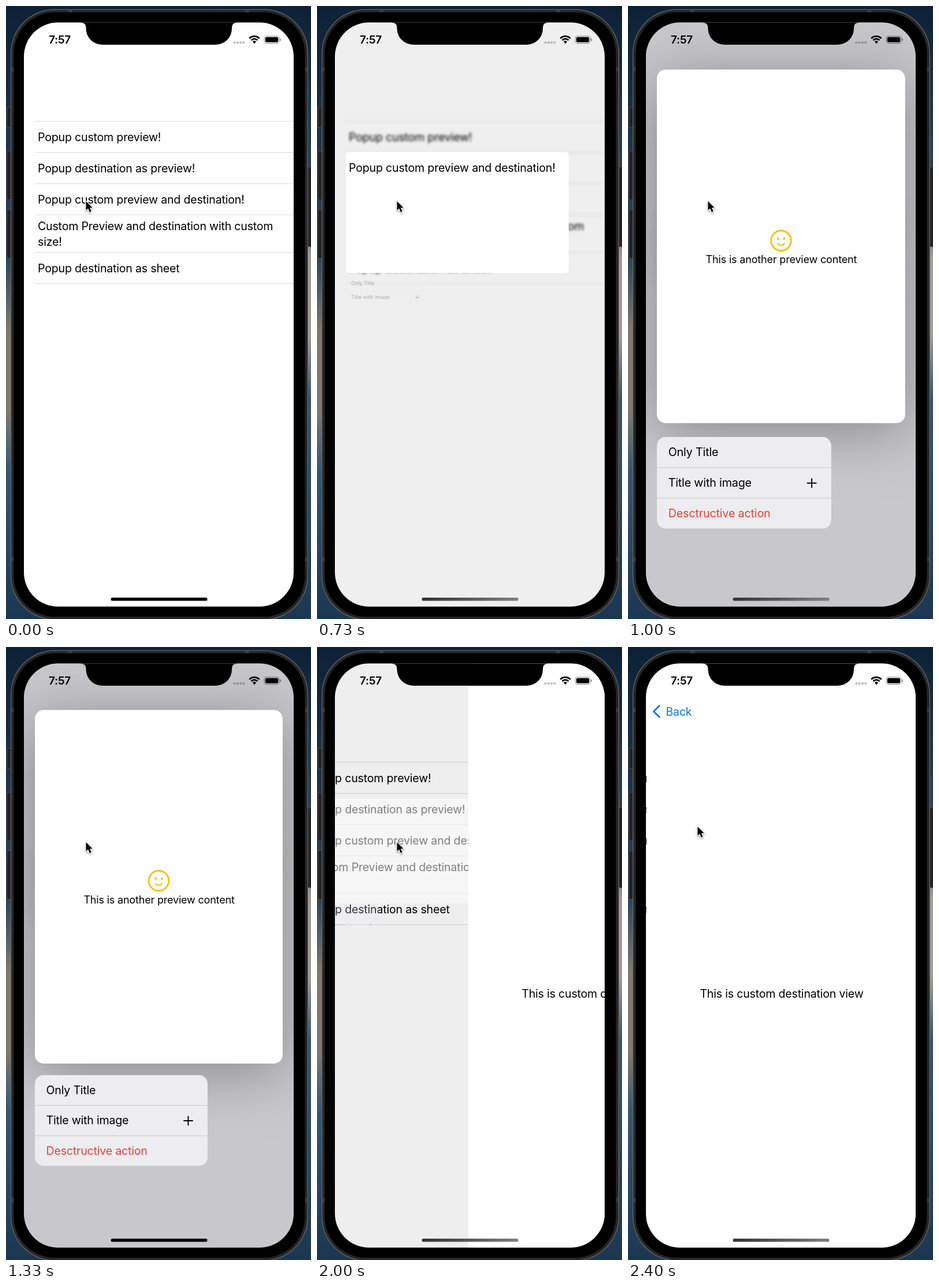
Recreate the animation shown at these times as an HTML page with a canvas. Size 528 by 1061 pixels, loop 2.47 s.

```html
<!DOCTYPE html>
<html lang="en">
<head>
<meta charset="utf-8">
<title>Context menu preview</title>
<style>
html, body { margin: 0; width: 100%; height: 100%; overflow: hidden; background: #000; }
canvas { display: block; width: 528px; height: 1061px; }
</style>
</head>
<body>
<canvas id="stage" width="528" height="1061"></canvas>
<script>
const c = document.getElementById('stage').getContext('2d');
const LOOP = 2470, STEP = 66.7, LAST = 36;
const OPEN_AT = 668, CLOSE_AT = 1900;
const SCREEN = { x: 31, y: 28.5, w: 467, h: 1011 };
const BLUE = '#0a76e8';
const ROWS = [
  ['Popup custom preview!'],
  ['Popup destination as preview!'],
  ['Popup custom preview and destination!'],
  ['Custom Preview and destination with custom', 'size!'],
  ['Popup destination as sheet']
];

const clamp = v => Math.min(1, Math.max(0, v));
const ramp = (v, a, b) => clamp((v - a) / (b - a));
const mix = (a, b, k) => a + (b - a) * k;

// Slightly bouncy spring that opens the preview
function openSpring(t) {
  const s = Math.max(0, t - OPEN_AT), a = .0119, b = .0088;
  return 1 - Math.exp(-a * s) * (Math.cos(b * s) + a / b * Math.sin(b * s));
}

// Critically damped spring that pushes the next page
function pushSpring(t) {
  const s = Math.max(0, t - CLOSE_AT) * .0168;
  return 1 - (1 + s) * Math.exp(-s);
}

function box(x, y, w, h, r, fill) {
  c.beginPath();
  c.roundRect(x, y, w, h, r);
  if (fill) { c.fillStyle = fill; c.fill(); }
}

function text(s, x, y, { size = 19.6, color = '#000', weight = 400, align = 'left' } = {}) {
  c.font = `${weight} ${size}px Inter, sans-serif`;
  c.letterSpacing = -size * .0105 + 'px';
  c.textAlign = align;
  c.fillStyle = color;
  c.fillText(s, x, y);
}

function stroke(color, width, points) {
  c.beginPath();
  points.forEach(([x, y]) => c.lineTo(x, y));
  c.strokeStyle = color;
  c.lineWidth = width;
  c.stroke();
}

function group(draw) {
  c.save();
  draw();
  c.restore();
}

// Wallpaper strip: dark sky, a pale band, then blue again
function drawSky(x, pale, from, to) {
  const sky = c.createLinearGradient(0, 0, 0, 1061);
  sky.addColorStop(0, '#0d2036');
  sky.addColorStop(from - .12, '#2b455d');
  sky.addColorStop(from, pale);
  sky.addColorStop(to, pale);
  sky.addColorStop(to + .1, '#355672');
  sky.addColorStop(1, '#1b3752');
  c.fillStyle = sky;
  c.fillRect(x, 0, 264, 1061);
}

function drawBody() {
  drawSky(0, '#7f7a70', .53, .66);
  drawSky(264, '#a09c96', .41, .54);

  [[1, 175, 36], [1, 251, 85], [1, 352, 85], [521, 278, 139]].forEach(([x, y, h]) => {
    box(x, y, 10, h, 2, '#4a4846');
    box(x + 1, y + 1, 8, h - 2, 2, '#232325');
  });
  box(8, 5.5, 515, 1057, 76, '#6c6761');
  box(9.2, 6.7, 512.6, 1054.6, 75, '#262627');
  c.fillStyle = '#3b3b3c';
  [106, 954].forEach(y => { c.fillRect(9, y, 6, 7); c.fillRect(516, y, 6, 7); });
  [108, 414].forEach(x => c.fillRect(x, 7, 7, 5));
  box(13.5, 11, 504, 1046, 71, '#000');
}

function drawList(shift, blur) {
  const line = y => { c.fillStyle = '#dcdcdd'; c.fillRect(50, y, 448, 1); };
  group(() => {
    c.translate(shift, 0);
    if (blur > .1) c.filter = `blur(${blur}px)`;
    let top = 199;
    line(top);
    for (const row of ROWS) {
      const extra = row.length - 1;
      row.forEach((s, i) => text(s, 55, top + 35 - 8 * extra + 27 * i));
      top += 54 + 11 * extra;
      line(top);
    }
  });
}

function drawSmiley(x, y) {
  c.strokeStyle = c.fillStyle = '#f8c313';
  c.lineWidth = 3;
  c.beginPath();
  c.arc(x, y, 17.3, 0, 7);
  c.stroke();
  [-5.3, 5.3].forEach(dx => {
    c.beginPath();
    c.ellipse(x + dx, y - 3.6, 1.9, 2.5, 0, 0, 7);
    c.fill();
  });
  c.lineWidth = 2.3;
  c.lineCap = 'round';
  c.beginPath();
  c.moveTo(x - 6, y + 5);
  c.quadraticCurveTo(x, y + 11, x + 6, y + 5);
  c.stroke();
}

// The card grows from the pressed row; its content is pinned to the top
function drawCard(p, closing) {
  const w = mix(369, 429, p), h = mix(54, 612, clamp(p));
  const y = mix(335, 415, p) - h / 2;
  const fade = ramp(p, .3, .65), alpha = closing ? clamp(p * 2.2) : 1;
  group(() => {
    c.globalAlpha = alpha;
    group(() => {
      c.shadowColor = `rgba(0,0,0,${.32 * fade})`;
      c.shadowBlur = 100;
      c.shadowOffsetY = 14;
      box(50, y, w, h, h / 40, '#fff');
    });
    c.clip();
    c.translate(50, y);
    if (!closing) {
      c.globalAlpha = 1 - fade;
      text(ROWS[2][0], 5, 34);
    }
    c.globalAlpha = alpha * fade;
    c.scale(w / 429, w / 429);
    drawSmiley(214.5, 295.5);
    text('This is another preview content', 215, 334.5, { size: 18, align: 'center' });
  });
}

function drawMenu(p) {
  const scale = mix(.26, 1, p);
  group(() => {
    c.globalAlpha = clamp(p);
    c.translate(50, mix(362, 741, p));
    c.scale(scale, scale);
    box(0, 0, 299, 157 * Math.min(1, scale * 1.17), 15, '#edecef');
    c.clip();
    c.fillStyle = '#c9c8cb';
    c.fillRect(0, 52, 299, 1);
    c.fillRect(0, 104.5, 299, 1);
    text('Only Title', 19.5, 33);
    text('Title with image', 19.5, 85.5);
    text('Desctructive action', 19.5, 138, { color: '#eb4039' });
    c.lineCap = 'round';
    stroke('#000', 1.9, [[258, 79], [273, 79]]);
    stroke('#000', 1.9, [[265.5, 71.5], [265.5, 86.5]]);
  });
}

function drawPage(push, t) {
  group(() => {
    c.translate(SCREEN.x + SCREEN.w * (1 - push), 0);
    c.fillStyle = '#fff';
    c.fillRect(0, SCREEN.y, SCREEN.w, SCREEN.h);
    text('This is custom destination view', 234, 607, { align: 'center' });
    c.globalAlpha = ramp(t, 2100, 2300);
    c.lineCap = c.lineJoin = 'round';
    stroke(BLUE, 2.8, [[22.5, 101.5], [12.5, 111.5], [22.5, 121.5]]);
    text('Back', 33.5, 118.5, { color: BLUE });
  });
}

function drawNotch() {
  c.fillStyle = '#000';
  c.beginPath();
  c.moveTo(130, 28);
  c.lineTo(130, 29);
  c.quadraticCurveTo(138.5, 29, 138.5, 38);
  c.arcTo(138.5, 67, 168, 67, 28);
  c.arcTo(391, 67, 391, 38, 28);
  c.lineTo(391, 38);
  c.quadraticCurveTo(391, 29, 399, 29);
  c.lineTo(399, 28);
  c.fill();
}

function drawStatus() {
  text('7:57', 93, 65, { size: 19, weight: 600, align: 'center' });
  for (let i = 0; i < 4; i++) box(393.5 + 5.25 * i, 61.2, 4, 4, 1.6, 'rgba(0,0,0,.26)');

  c.strokeStyle = c.fillStyle = '#000';
  c.lineWidth = 2.7;
  [7.6, 12.2].forEach(r => {
    c.beginPath();
    c.arc(430, 64.5, r, -Math.PI * .755, -Math.PI * .245);
    c.stroke();
  });
  c.beginPath();
  c.moveTo(430, 65.5);
  c.arc(430, 64.5, 4.2, -Math.PI * .76, -Math.PI * .24);
  c.fill();

  box(447, 52, 26, 12.6, 4);
  c.strokeStyle = 'rgba(0,0,0,.42)';
  c.lineWidth = 1.1;
  c.stroke();
  box(448.8, 53.8, 22.4, 9, 2.5, '#000');
  box(474.2, 56.2, 1.8, 4.2, 1, 'rgba(0,0,0,.45)');
}

// The home bar turns grey while the screen is changing
function drawHomeBar(t) {
  const plain = t < OPEN_AT || (t > 1120 && t < CLOSE_AT);
  const shade = c.createLinearGradient(182, 1023, 348, 1030);
  shade.addColorStop(0, '#333');
  shade.addColorStop(1, '#808080');
  box(181.5, 1024, 167, 5.6, 2.8, plain ? '#000' : shade);
}

function drawCursor(t) {
  const k = ramp(t, 2180, 2400);
  group(() => {
    c.translate(mix(138.5, 120.5, k), mix(338, 311, k));
    c.beginPath();
    [[0, 0], [0, 15.5], [3.6, 12.3], [6.4, 18.8], [9.2, 17.6], [6.5, 11.3], [11.2, 11]]
      .forEach(([x, y]) => c.lineTo(x, y));
    c.closePath();
    c.lineJoin = 'round';
    c.strokeStyle = '#fff';
    c.lineWidth = 2.4;
    c.shadowColor = 'rgba(0,0,0,.4)';
    c.shadowBlur = 3;
    c.shadowOffsetY = 1.5;
    c.stroke();
    c.shadowColor = 'transparent';
    c.fillStyle = '#000';
    c.fill();
  });
}

function draw(t) {
  const push = pushSpring(t), shift = -140 * push, closing = push > 0;
  const p = closing ? (1 - push) ** 2.1 : openSpring(t);
  const dim = clamp(p + .15 * push);
  drawBody();
  group(() => {
    box(SCREEN.x, SCREEN.y, SCREEN.w, SCREEN.h, 59, '#fff');
    c.clip();
    drawList(shift, 26 * ramp(p, .23, .8));
    c.fillStyle = `rgba(11,7,20,${.225 * dim})`;
    c.fillRect(SCREEN.x, SCREEN.y, SCREEN.w, SCREEN.h);
    if (p > 0) {
      group(() => {
        c.translate(shift, 0);
        drawCard(p, closing);
        drawMenu(p);
      });
    }
    if (closing) drawPage(push, t);
    drawNotch();
    drawStatus();
    drawHomeBar(t);
    drawCursor(t);
  });
}

const start = performance.now();
function tick() {
  const t = (performance.now() - start) % LOOP;
  draw(Math.min(LAST, Math.floor((t + 5) / STEP)) * STEP);
  requestAnimationFrame(tick);
}
tick();
</script>
</body>
</html>
```
